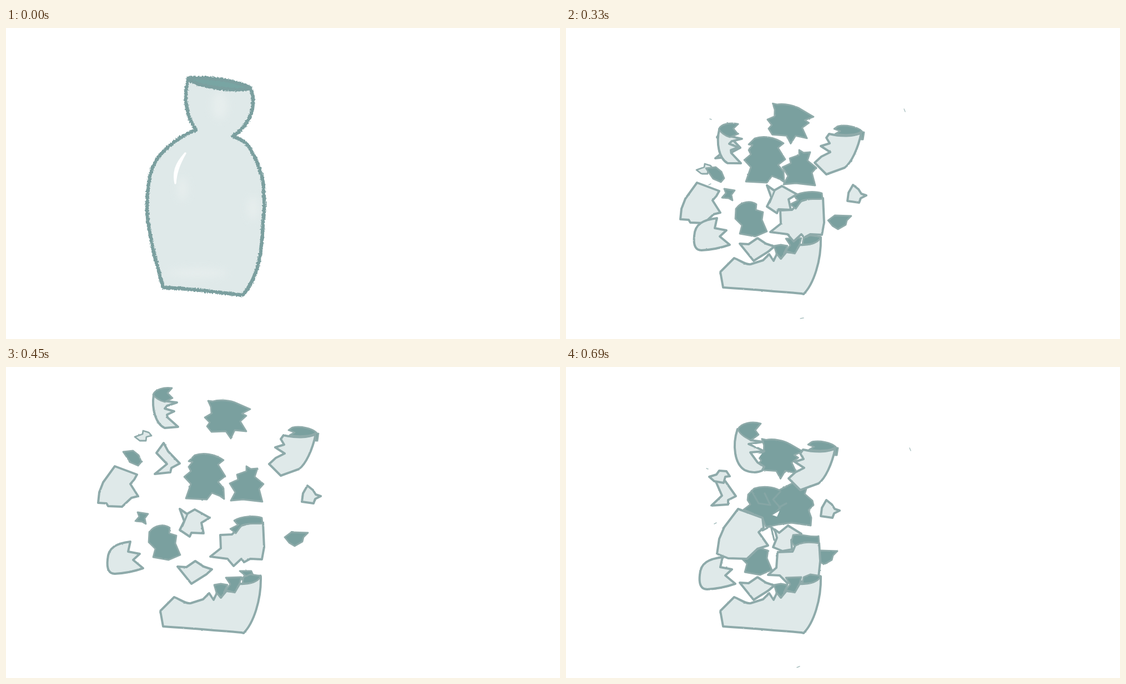
An HTML page for the animation above (780 ms loop, 998x561 px).

```html
<!DOCTYPE html>
<html lang="en">
<head>
<meta charset="utf-8">
<title>Breaking bottle</title>
<style>
  html, body { margin: 0; width: 100%; height: 100%; overflow: hidden; background: #fff; }
  svg { display: block; width: 100vw; height: 100vh; }
  path { stroke-linejoin: round; stroke-linecap: round; }
  .l { fill: #dfe9e9; stroke: #8eaaaa; stroke-width: 4; }
  .d { fill: #7aa09f; stroke: #8fabaa; stroke-width: 2.8; }
  .n { fill: none; stroke: #8eaaaa; stroke-width: 3.2; }
  .w { fill: #fff; }
  .speck { fill: none; stroke: #a9c0c0; stroke-width: 1.4; }
  .pose { animation: 780ms step-end infinite; }
  #whole { animation-name: whole; }
  #crack { animation-name: crack; }
  #burst { animation-name: burst; }
  #apart { animation-name: apart; }
  /* 240, 330, 450, 570 and 690 ms of 780 */
  @keyframes whole { 0% { visibility: visible } 30.769%, 100% { visibility: hidden } }
  @keyframes crack {
    0% { visibility: hidden } 30.769% { visibility: visible }
    42.308% { visibility: hidden } 88.462%, 100% { visibility: visible }
  }
  @keyframes burst {
    0% { visibility: hidden } 42.308% { visibility: visible } 57.692% { visibility: hidden }
    73.077% { visibility: visible } 88.462%, 100% { visibility: hidden }
  }
  @keyframes apart {
    0% { visibility: hidden } 57.692% { visibility: visible } 73.077%, 100% { visibility: hidden }
  }
</style>
</head>
<body>
<svg viewBox="0 0 998 561" preserveAspectRatio="none">
  <defs>
    <filter id="fuzz" x="0" y="0" width="998" height="561" filterUnits="userSpaceOnUse" color-interpolation-filters="sRGB">
      <feTurbulence type="fractalNoise" baseFrequency=".35" numOctaves="2" seed="4"/>
      <feDisplacementMap in="SourceGraphic" scale="5" xChannelSelector="R" yChannelSelector="G"/>
    </filter>
    <filter id="rough" x="0" y="0" width="998" height="561" filterUnits="userSpaceOnUse" color-interpolation-filters="sRGB">
      <feTurbulence type="fractalNoise" baseFrequency=".16" numOctaves="2" seed="9"/>
      <feDisplacementMap in="SourceGraphic" scale="1.8" xChannelSelector="R" yChannelSelector="G"/>
    </filter>
    <filter id="soft" x="-50%" y="-50%" width="200%" height="200%"><feGaussianBlur stdDeviation="7"/></filter>

    <path id="bottle" d="M329 92C320 118 322 155 342 184C314 194 291 213 274 234C256 258 255 290 254 322C254 352 262 385 268 412L283 468C330 470 380 476 426 482C455 450 461 405 463 350C467 325 465 300 463 278C458 250 447 230 437 213C430 204 420 200 409 195C430 181 440 165 444 145C446 130 445 118 441 111"/>
    <g id="neckL">
      <path class="l" d="M266 50C262 76 270 103 286 110L310 108 300 99 291 91 290 86 303 80 286 75 290 70 308 64 284 61Z"/>
      <path class="d" d="M265 50C268 40 285 36 299 38L291 47 300 56 286 63C278 61 270 57 265 50Z"/>
    </g>
    <path id="backTop" class="d" d="M364 61L372 62C385 58 405 60 415 65L440 76 425 84 433 88 422 98 433 116 412 114 405 129 396 116 370 117 362 107 367 100 358 91 370 84 369 72Z"/>
    <path id="backMid" class="d" d="M329 170L340 159C355 154 375 156 392 168L382 176 395 197 382 207 392 219 393 238 386 233 371 227 362 239 324 237 333 211 321 198 333 188 329 180 336 171Z"/>
    <path id="backR" class="d" d="M433 179L441 184 453 183 448 198 464 211 456 220 462 243 427 239 405 241 413 226 403 210 418 203 416 194 433 188Z"/>
    <g id="neckR">
      <path class="l" d="M500 123C520 128 545 128 558 121C552 150 540 175 528 184L495 196 474 175 486 164 502 156 485 145 501 140 495 130Z"/>
      <path class="d" d="M509 114L516 109C530 106 550 110 559 118C550 125 530 126 511 123L520 118Z"/>
      <path class="d" d="M558 119L563 120 561 133 558 133Z"/>
    </g>
    <path id="chipR" class="l" d="M543 214L553 222 558 230 567 233 557 238 554 246 533 243 535 228Z"/>
    <path id="darkR" class="d" d="M502 307L514 298 544 299 536 307 534 315 520 323 510 317Z"/>
    <g id="side">
      <path class="l" d="M386 303L407 302 424 286C440 281 455 280 463 281L465 325 461 347 440 346 429 352 424 346 410 359 399 346 368 342 387 327Z"/>
      <path class="d" d="M411 277C425 268 450 268 461 272L462 282C450 284 435 280 424 286L414 300 404 292 418 285Z"/>
    </g>
    <path id="lip" class="d" d="M428 379L440 374 459 377C454 388 440 392 426 390Z"/>
    <g id="base">
      <path class="l" d="M278 440L303 415C315 420 325 428 333 426L355 419 366 408 374 420 380 407 387 416 397 404 412 406 421 391C437 392 450 388 459 378C460 420 446 462 428 480L424 479C375 475 330 471 283 468Z"/>
      <path class="d" d="M375 393L387 391 399 393 388 416 379 407Z"/>
      <path class="d" d="M396 380L424 379 421 390 412 407 396 402 404 392Z"/>
      <use href="#lip"/>
    </g>
    <path id="belly" class="l" d="M196 179L236 194 231 203 224 211 238 233 226 236 209 252 184 251 181 246 166 245 168 226 175 208Z"/>
    <path id="hip" class="l" d="M224 315C200 318 184 325 183 347C181 365 186 373 196 373C215 372 230 369 247 363L229 348 241 337 220 333Z"/>
    <path id="chipL" class="l" style="stroke-width:2.8" d="M232 126L246 121 247 115 257 118 262 124 253 126 252 133 241 133Z"/>
    <path id="arrow" class="l" d="M284 137L292 152 313 174 298 182 296 190 268 193 290 175 271 155Z"/>
    <path id="darkL" class="d" d="M211 153L229 151 239 159 244 171 238 178 224 172Z"/>
    <path id="darkS" class="d" d="M237 262L256 265 250 273 252 283 245 279 233 278 240 270Z"/>
    <path id="backL" class="d" d="M258 298C268 284 285 283 295 290L294 300 307 304 305 318 314 339 293 348 265 343 269 328 257 316Z"/>
    <g id="star">
      <path class="l" d="M313 256L326 265 340 257 367 272 352 281 356 300 334 299 331 306 313 294 321 278Z"/>
      <path class="n" d="M327 265L318 287"/>
    </g>
    <path id="kite" class="l" d="M309 360L325 361 341 350 356 360 371 365 361 374 334 391Z"/>
  </defs>

  <g id="whole" class="pose">
    <use href="#bottle" fill="#dfe9e9"/>
    <g fill="#edf2f1" opacity=".55" filter="url(#soft)">
      <ellipse cx="318" cy="290" rx="9" ry="22"/>
      <ellipse cx="445" cy="325" rx="10" ry="22"/>
      <ellipse cx="345" cy="442" rx="55" ry="8"/>
      <ellipse cx="385" cy="140" rx="14" ry="25"/>
    </g>
    <g filter="url(#fuzz)" fill="none" stroke="#7b9f9f" stroke-width="6.5">
      <use href="#bottle"/>
      <path fill="#78a5a3" d="M328 91C360 87 418 95 440 108C432 113 400 112 372 107C350 103 335 99 328 91Z"/>
    </g>
    <path d="M323 226C306 245 301 259 305 280C306 262 311 247 323 226Z" fill="#fff" stroke="#fff" stroke-width="3.4"/>
  </g>

  <g id="crack" class="pose" filter="url(#rough)">
    <use href="#backTop" transform="translate(-15 72) rotate(6 399 95)"/>
    <path class="l" d="M309 112C299 142 304 175 322 186C333 191 345 191 353 187L357 180 345 172 332 154 357 152 345 146 329 139 355 135 333 132Z"/>
    <path class="w" d="M335 139L352 139 344 145ZM338 157L353 156 345 167Z"/>
    <path class="d" d="M310 112C315 101 335 97 351 102L341 114 347 122 333 132C322 127 312 120 310 112Z"/>
    <path class="d" d="M328 230L339 219C354 214 374 216 384 222L411 208 424 214 433 220 430 229 444 241 446 249 437 258 442 272 441 286 406 281 384 284 369 287 360 288 354 272 320 257 332 248 327 240Z"/>
    <path class="n" opacity=".6" d="M334 223L347 246 368 249 358 228M386 225L373 239 386 254 372 267M384 253L397 246"/>
    <path class="w" d="M372 267L385 259 380 270Z"/>
    <use href="#neckR" x="-73" y="26"/>
    <use href="#chipR" x="-74" y="26"/>
    <path class="l" d="M270 207L287 206 306 233 292 240 292 248 262 250 281 232Z"/>
    <path class="l" d="M258 198L271 194 276 187 289 188 295 197 287 198 284 209 267 206Z"/>
    <use href="#backL" x="57" y="27"/>
    <path class="l" d="M310 256L354 272 356 290 347 298 364 322 345 328 326 346 292 345 272 337 276 310 285 289Z"/>
    <path class="n" d="M354 295L369 287 375 312M372 290L379 300"/>
    <path class="l" d="M376 293L384 299 400 286 424 301 406 312 407 329 390 332 373 325 380 308Z"/>
    <use href="#darkR" x="-55" y="33"/>
    <path class="l" d="M410 329L414 319C430 314 448 315 456 318L458 350 455 378C440 390 420 385 399 390L385 376 364 375 379 362 381 334 408 333Z"/>
    <path class="d" d="M409 303C425 300 440 308 455 305L456 318C435 315 425 316 412 323L406 316Z"/>
    <use href="#hip" x="58" y="28"/>
    <use href="#kite" x="4" y="29"/>
    <use href="#base"/>
    <path class="n" d="M363 404L374 396"/>
    <path class="speck" d="M619 146L621 151M253 183L256 184M267 283L271 281M416 542L421 540"/>
  </g>

  <g id="burst" class="pose" filter="url(#rough)">
    <use href="#arrow" x="1" y="42"/>
    <use href="#neckL" transform="translate(8 134) rotate(5 287 75)"/>
    <use href="#backTop" transform="translate(4 79) rotate(7 399 95)"/>
    <use href="#backMid" y="40"/>
    <use href="#backR" x="-13" y="41"/>
    <use href="#neckR" x="-26" y="68"/>
    <use href="#chipR" x="-26" y="69"/>
    <use href="#darkR" x="-30" y="40"/>
    <use href="#chipL" x="3" y="130"/>
    <use href="#darkL" x="41" y="100"/>
    <use href="#darkS" x="48" y="28"/>
    <use href="#backL" x="48" y="28"/>
    <use href="#belly" x="40" y="100"/>
    <use href="#hip" x="48" y="28"/>
    <use href="#star" x="49" y="28"/>
    <use href="#kite" x="4" y="29"/>
    <use href="#base"/>
    <use href="#side" y="26"/>
    <use href="#lip"/>
    <path class="n" d="M363 404L374 396"/>
    <path class="speck" d="M609 146L611 151M259 164L262 165M257 283L261 281M422 524L428 523"/>
  </g>

  <g id="apart" class="pose" filter="url(#rough)">
    <use href="#neckL"/>
    <use href="#backTop"/>
    <use href="#backMid"/>
    <use href="#backR"/>
    <use href="#neckR"/>
    <use href="#chipR"/>
    <use href="#darkR"/>
    <use href="#chipL"/>
    <use href="#arrow"/>
    <use href="#darkL"/>
    <use href="#darkS"/>
    <use href="#backL"/>
    <use href="#belly"/>
    <use href="#hip"/>
    <use href="#star"/>
    <use href="#kite"/>
    <path class="d" d="M421 368L442 368 446 377 459 376 454 390 433 391 424 382 431 376Z"/>
    <use href="#base"/>
    <use href="#side"/>
  </g>
</svg>
</body>
</html>
```
